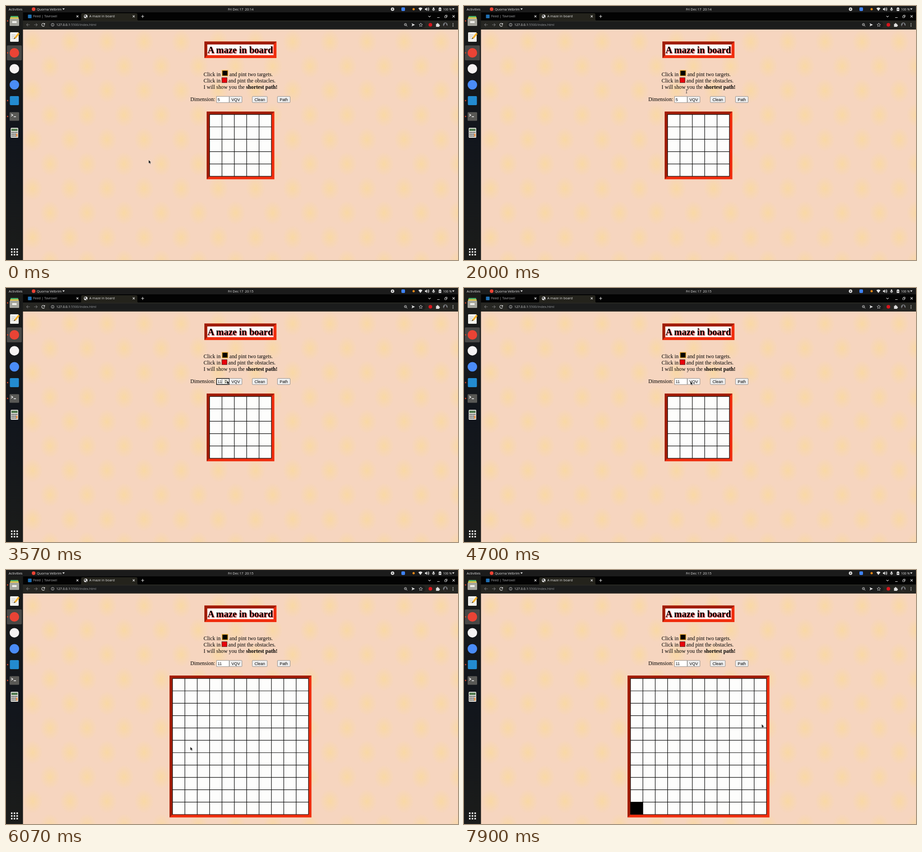
An HTML page that plays this animation: 998x561 px, repeating every 8 s.

```html
<!DOCTYPE html>
<html lang="en">
<head>
<meta charset="utf-8">
<title>A maze in board</title>
<style>
  html, body { margin: 0; width: 100%; height: 100%; overflow: hidden; background: #000; }
  svg { display: block; width: 100vw; height: 100vh; }
  text { white-space: pre; }
  .ui { font: 7.4px "Open Sans", "Noto Sans", sans-serif; fill: #e4e4e4; }
  .serif { font: 11.75px "Liberation Serif", serif; }
  .form { font: 8.9px "Liberation Sans", sans-serif; }
  .mid { text-anchor: middle; }
  .line { fill: none; stroke: #ddd; stroke-width: 1.1; }
  .title { font: bold 20.55px "Liberation Serif", serif; text-shadow: 1px 1px 2px #f00000; }
  .field { fill: #fff; stroke: #767676; stroke-width: .8; }
  .button { fill: #efefef; stroke: #767676; stroke-width: .8; }
</style>
</head>
<body>
<svg viewBox="0 0 998 561" preserveAspectRatio="none">
  <defs>
    <radialGradient id="glow">
      <stop offset="0" stop-color="#fad99f" stop-opacity=".8"/>
      <stop offset="1" stop-color="#fad99f" stop-opacity="0"/>
    </radialGradient>
    <pattern id="paper" width="82" height="108" patternUnits="userSpaceOnUse" patternTransform="translate(37 52)">
      <rect width="82" height="108" fill="#f6d5bf"/>
      <g fill="url(#glow)">
        <ellipse cx="22" cy="27" rx="22" ry="27"/>
        <ellipse cx="60" cy="81" rx="22" ry="27"/>
      </g>
    </pattern>
    <linearGradient id="dock" x2="0" y2="1">
      <stop offset="0" stop-color="#1b1c1a"/>
      <stop offset=".5" stop-color="#11151c"/>
      <stop offset="1" stop-color="#1b1c1a"/>
    </linearGradient>
  </defs>

  <rect x="37" y="51" width="961" height="510" fill="url(#paper)"/>

  <!-- system bar -->
  <rect width="998" height="14" fill="#1b1b1b"/>
  <g class="ui">
    <text x="6" y="9.8">Activities</text>
    <circle cx="61" cy="7" r="4" fill="#ea4335"/>
    <text x="68" y="9.8">Quorna Velbrim</text>
    <path d="M124.500 5.300h5.200l-2.600 3.400z"/>
    <text x="490" y="9.8">Fri Dec 17</text>
    <text id="clock" x="527.5" y="9.8">20:14</text>
    <text x="965" y="9.500" font-size="6.800">100 %</text>
    <path d="M985 5.300h5.200l-2.600 3.400z"/>
    <circle cx="853.5" cy="7" r="3.800"/>
    <circle cx="853.5" cy="7" r="1.500" fill="#444"/>
    <rect x="873" y="3" width="8" height="8" rx="2" fill="#3f82f5"/>
    <circle cx="900" cy="7" r="2.500" fill="#f08a18"/>
    <path d="M910.500 5q4.500-3.500 9 0l-4.500 6z"/>
    <path d="M925 5.500h2l2.500-2.500v8l-2.500-2.500h-2z"/>
    <path class="line" d="M931 4.500q2 2.500 0 5M932.500 3q3 4 0 8" stroke-width=".8"/>
    <rect x="942.5" y="3" width="3" height="5" rx="1.500"/>
    <path class="line" d="M941.500 6.500q0 3 2.500 3t2.500-3M944 9v2" stroke-width=".8"/>
    <path d="M955.500 4h1.500v-1h2.500v1h1.500v7h-5.500z"/>
    <path d="M958.800 5l-2 2.800h1.400l-.5 2.200 2-3h-1.400z" fill="#222"/>
  </g>

  <!-- browser -->
  <rect x="37" y="14" width="961" height="18" fill="#030303"/>
  <path d="M164 32q2 0 2-3v-10q0-3 3-3h118q3 0 3 3v10q0 3 2 3z" fill="#24231c"/>
  <rect x="37" y="32" width="961" height="20" fill="#262622"/>
  <rect x="95" y="34.500" width="831" height="14.500" rx="7" fill="#1b1c1c"/>
  <g class="ui">
    <rect x="48.500" y="19" width="8" height="8" rx="1" fill="#1f6fb2"/>
    <text x="60" y="25.400" fill="#a9abae">Feed | Tavroxel</text>
    <text x="184" y="25.400">A maze in board</text>
    <circle cx="176" cy="23" r="4"/>
    <path d="M173 21l3-1 1 2-2 2-2-1zM176 25l2-1 1 1-2 2z" fill="#333"/>
    <text x="111" y="44.200" font-size="7.300">127.0.0.1<tspan fill="#96999c">:5500/index.html</tspan></text>
  </g>
  <g class="line">
    <path d="M155.500 20.700l4.400 4.400m0-4.400l-4.400 4.400M279.800 20.700l4.400 4.400m0-4.400l-4.400 4.400M298.500 23h6.400m-3.200-3.200v6.400"/>
    <path d="M932.500 21.800l2.600 2.500 2.600-2.500M952 25.500h5.500M985.800 20.300l5 5m0-5l-5 5"/>
    <path d="M968.700 22h3.800v3.800h-3.800zM970.200 21.500v-1.300h3.800v3.800h-1.200" stroke-width=".9"/>
    <path d="M52.500 41.500h-7m3-3.200l-3.200 3.200 3.200 3.200M62 41.500h7m-3-3.200l3.200 3.200-3.200 3.200" stroke="#707070"/>
    <path d="M85 39.800a3.300 3.300 0 1 0 .3 2.800M85.500 38v2.500h-2.700"/>
    <circle cx="103" cy="41.500" r="3.200" stroke-width=".8"/>
    <path d="M103 41v2.200M103 39.400v.8" stroke-width=".8"/>
    <circle cx="882" cy="41" r="2.500" stroke-width=".9"/>
    <path d="M884 43l2.200 2.200M880.800 41h2.400" stroke-width=".9"/>
    <path d="M915.800 37.700l1.200 2.500 2.700.3-2 1.900.5 2.700-2.400-1.300-2.400 1.300.5-2.700-2-1.900 2.700-.3z" stroke-width=".8"/>
  </g>
  <g fill="#ddd">
    <path d="M895.500 38l7.500 3.500-7.500 3.500 1.500-3.500z"/>
    <path d="M949.500 39.500h2q.2-2 1.500-2t1.500 2h2v2q1.700.2 1.700 1.500t-1.700 1.500v1.500h-7z"/>
    <circle cx="987" cy="38.700" r=".9"/><circle cx="987" cy="41.600" r=".9"/><circle cx="987" cy="44.500" r=".9"/>
  </g>
  <circle cx="937" cy="41.500" r="4" fill="#d8141c"/>
  <circle cx="970" cy="41.500" r="5" fill="#777b80"/>
  <path d="M966.500 45q0-3 2.500-3.200a2 2 0 1 1 2.500 0q2.500.2 2.500 3.200-3.500 2.600-7.500 0" fill="#26211f"/>

  <!-- dock -->
  <rect y="14" width="37.500" height="547" fill="url(#dock)"/>
  <rect x="2" y="87" width="33" height="33" rx="2" fill="#484846"/>
  <g id="dots" fill="#e2482a"></g>
  <rect x="10" y="22" width="17" height="5" rx="1" fill="#4caf6a"/>
  <rect x="9" y="25" width="19" height="5" rx="1" fill="#e3c74a"/>
  <rect x="8" y="28" width="21" height="16" rx="1.500" fill="#a5a59d"/>
  <rect x="13.500" y="33.500" width="10" height="4" rx="1" fill="#f4f4f0"/>
  <rect x="9" y="58" width="19" height="21" rx="1.500" fill="#f2f2ee"/>
  <path d="M12 64h9M12 67.500h7M12 71h5" stroke="#bbb"/>
  <path d="M17 73l2-4 8-10 3 2.500-8 10z" fill="#f3b02c"/>
  <path d="M17 73l1.600-3.300 2.200 1.700z" fill="#333"/>
  <circle cx="18.500" cy="103.500" r="10.500" fill="#ea4335"/>
  <circle cx="18.500" cy="138.700" r="10.500" fill="#f5f3f3"/>
  <circle cx="18.500" cy="174" r="10.500" fill="#4a8cf7"/>
  <rect x="8.500" y="199" width="20" height="20" rx="2" fill="#238bd0"/>
  <rect x="8" y="234.500" width="21" height="19" rx="1.500" fill="#595956"/>
  <path d="M11.500 238.500l3.500 2.500-3.500 2.500M17 244.500h5" fill="none" stroke="#fff" stroke-width="1.500"/>
  <rect x="10.500" y="269" width="16.500" height="22" rx="1.500" fill="#e5e5df"/>
  <rect x="12" y="271" width="13.500" height="5" fill="#50794f"/>
  <g id="keys" fill="#555"></g>
  <g id="apps" fill="#f0f0f0"></g>

  <!-- page -->
  <g id="heading"></g>
  <text class="title" x="445" y="104">A maze in board</text>
  <g class="serif">
    <text x="436.300" y="155">Click in</text>
    <rect x="476.500" y="141.500" width="14" height="13.500" fill="#e5a12c"/>
    <rect x="478" y="143" width="11" height="10.500"/>
    <text x="493.200" y="155">and pint two targets.</text>
    <text x="436.300" y="169">Click in</text>
    <rect x="476.700" y="158.200" width="11.300" height="11" fill="#e8000c" stroke="#301010" stroke-width=".8"/>
    <text x="490.800" y="169">and pint the obstacles.</text>
    <text x="436.300" y="183">I will show you the <tspan font-weight="bold">shortest path!</tspan></text>
    <text x="407" y="209.500">Dimension:</text>
  </g>
  <g class="form">
    <rect id="field" class="field" x="465" y="199.800" width="27.800" height="13.400"/>
    <text id="value" x="467.200" y="209.600">5</text>
    <rect id="caret" x="476.600" y="201.800" width=".7" height="9.500"/>
    <g id="spinner">
      <rect x="480.500" y="201.500" width="9.500" height="10" fill="#e6e4d8"/>
      <path d="M483 205.500l2.300-2.500 2.300 2.500zM483 207.700l2.300 2.500 2.300-2.500z" fill="#444"/>
    </g>
    <rect id="build" class="button" x="493.200" y="199.800" width="27.800" height="13.400" rx="1.300"/>
    <text class="mid" x="507.200" y="209.600">VQV</text>
    <rect class="button" x="543.800" y="199.800" width="33" height="13.400" rx="1.300"/>
    <text class="mid" x="560.300" y="209.600">Clean</text>
    <rect class="button" x="599.400" y="199.800" width="28" height="13.400" rx="1.300"/>
    <text class="mid" x="613.400" y="209.600">Path</text>
  </g>
  <g id="small"></g>
  <g id="large"></g>
  <rect id="target" x="367.600" y="512.600" width="27.400" height="27.300"/>

  <g id="pointer">
    <path id="arrow" d="M0 0v7.800l1.800-1.600 1.300 2.900 1.300-.6-1.300-2.800h2.400z" fill="#111" stroke="#fff" stroke-opacity=".75" stroke-width=".5"/>
    <path id="beam" d="M-1.500-3.700h3M0-3.700v7.400M-1.500 3.700h3" fill="none" stroke="#333" stroke-width=".8"/>
  </g>
</svg>
<script>
const $ = id => document.getElementById(id);
const LOOP = 8000, CELL = 27.3, EDGE = 6.5;

// Bevelled red frame around a white area.
function frame(x, y, w, h) {
  const shade = `M${x} ${y}h${w}l${-EDGE} ${EDGE}h${2 * EDGE - w}v${h - 2 * EDGE}l${-EDGE} ${EDGE}z`;
  return `<rect x="${x}" y="${y}" width="${w}" height="${h}" fill="#f02d0e"/>
    <path d="${shade}" fill="#a01d08"/>
    <rect x="${x + EDGE}" y="${y + EDGE}" width="${w - 2 * EDGE}" height="${h - 2 * EDGE}" fill="#fdfdfc"/>`;
}

function board(n) {
  const size = n * CELL, x = 517.8 - size / 2, y = 239.7;
  let lines = '';
  for (let i = 0; i <= n; i++)
    lines += `M${x + i * CELL} ${y}v${size}M${x} ${y + i * CELL}h${size}`;
  return frame(x - EDGE, y - EDGE, size + 2 * EDGE, size + 2 * EDGE) +
    `<path d="${lines}" stroke="#0a0a0a" stroke-width="1.2"/>`;
}

function squares(x, y, cols, rows, stepX, stepY, size) {
  return Array.from({ length: cols * rows }, (_, i) =>
    `<rect x="${x + i % cols * stepX}" y="${y + Math.floor(i / cols) * stepY}" width="${size}" height="${size}"/>`).join('');
}

$('heading').innerHTML = frame(438, 78.5, 159.2, 36.5);
$('small').innerHTML = board(5);
$('large').innerHTML = board(11);
$('dots').innerHTML = [33, 103.5, 209, 244].map(y => `<circle cx="3.5" cy="${y}" r="1.4"/>`).join('');
$('keys').innerHTML = squares(12.2, 278, 4, 3, 3.5, 4, 2.5) +
  '<rect x="22.7" y="282" width="2.5" height="6.5" fill="#ee7d20"/>';
$('apps').innerHTML = squares(11, 535.5, 3, 3, 6, 6, 3.4);

// Pointer stops: time, x, y.
const route = [
  [0, 315, 340], [1100, 315, 340], [1300, 413.5, 310], [1370, 413.5, 310],
  [1900, 491, 184], [2000, 491.3, 188.5], [2300, 488, 204.5],
  [3970, 488, 204.5], [4170, 500, 206], [5500, 500, 206],
  [6070, 407, 390.5], [6150, 407, 390.5], [6270, 388, 500], [6470, 382, 524],
  [7170, 382, 524], [7900, 657.3, 340.5], [LOOP, 657.3, 340.5]
];
const counts = [[0, 5], [2700, 6], [2970, 7], [3130, 8], [3270, 9], [3430, 10], [3570, 11]];

function pointerAt(t) {
  const i = route.findIndex(stop => stop[0] > t);
  const [t0, x0, y0] = route[i - 1], [t1, x1, y1] = route[i];
  const k = (t - t0) / (t1 - t0);
  return [x0 + (x1 - x0) * k, y0 + (y1 - y0) * k];
}

const show = (id, on) => $(id).setAttribute('visibility', on ? 'visible' : 'hidden');

function draw(now) {
  const t = now % LOOP;
  const during = (from, to = LOOP) => t >= from && t < to;
  const focused = during(2700, 4700), built = during(4770);

  $('pointer').setAttribute('transform', `translate(${pointerAt(t)})`);
  const overText = during(1880, 2200);
  show('arrow', !overText);
  show('beam', overText);

  $('clock').textContent = during(3030) ? '20:15' : '20:14';
  $('value').textContent = counts.filter(c => c[0] <= t).pop()[1];
  $('field').style.stroke = focused ? '#101010' : '#767676';
  $('field').style.strokeWidth = focused ? 1.5 : .8;
  show('caret', during(3430, 3830));
  show('spinner', during(2170, 4700) && (focused || t < 4070));
  $('build').style.fill = during(4700, 4770) ? '#f5f5f5' : during(4070, 5560) ? '#dcdcda' : '#efefef';
  show('small', !built);
  show('large', built);
  show('target', during(6870));
  requestAnimationFrame(draw);
}
requestAnimationFrame(draw);
</script>
</body>
</html>
```
